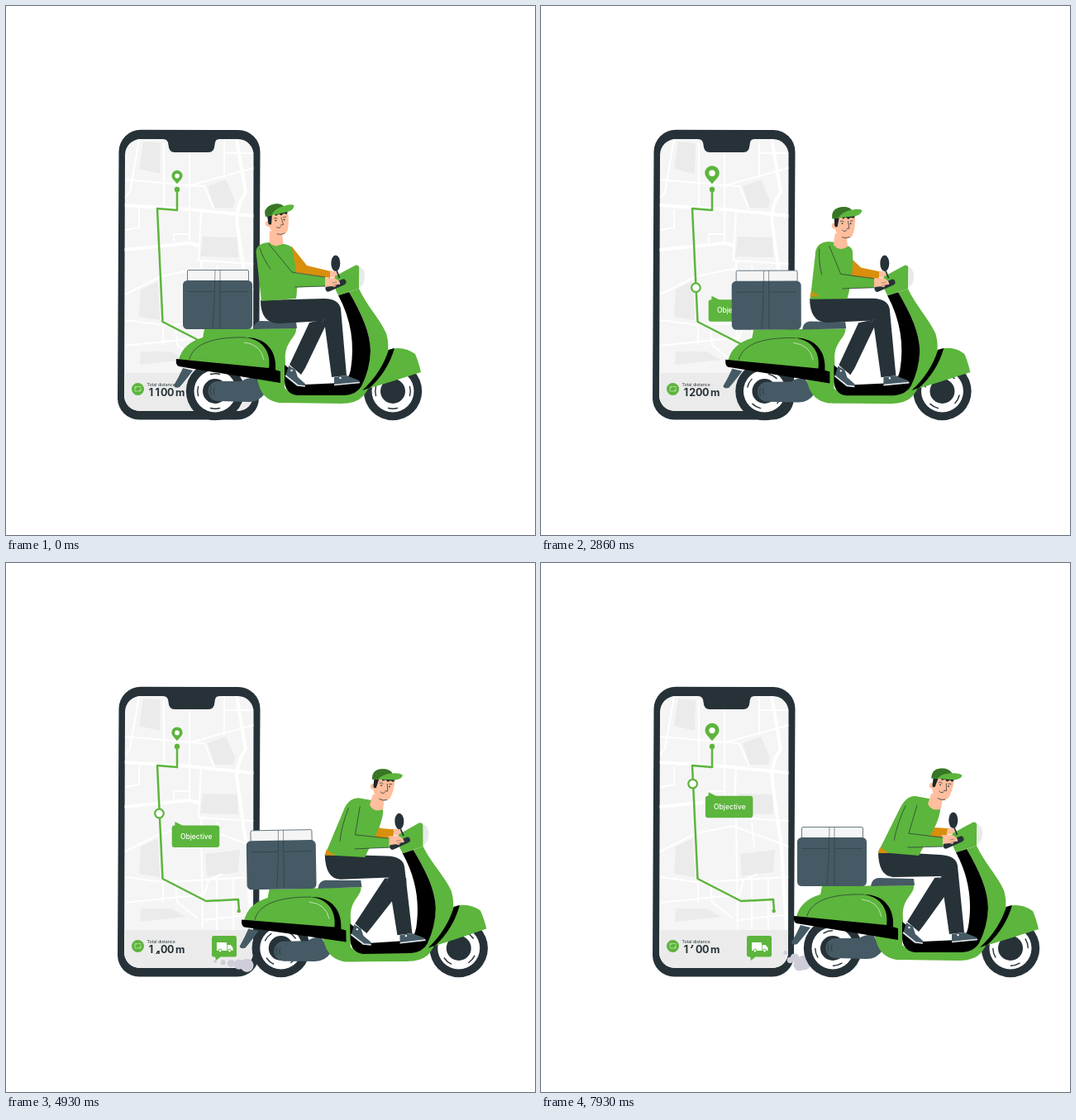
Animation, 640 px wide and 640 px high, one loop 8000 ms. Source, as an HTML page:

```html
<!DOCTYPE html>
<html lang="en">
<head>
<meta charset="utf-8">
<title>Delivery tracking</title>
<style>
html, body { margin: 0; width: 100%; height: 100%; overflow: hidden; background: #fff; }
svg { display: block; width: 100%; height: 100%; }
text { font-family: Inter, "Open Sans", sans-serif; }
.green { fill: #5cb53c; }
.navy { fill: #263238; }
.slate { fill: #455a64; }
.skin { fill: #ffbe9d; }
.orange { fill: #d98f0c; }
.pale { fill: #ebebeb; }
.white { fill: #fff; }
.road { fill: none; stroke: #fff; stroke-width: 2; }
.wide { stroke-width: 4; }
.thin { fill: none; stroke: #263238; stroke-width: .7; stroke-linecap: round; }
.num { font-size: 12.5px; font-weight: 700; text-anchor: middle; }
</style>
</head>
<body>
<svg viewBox="0 0 640 640">
  <defs>
    <clipPath id="screen"><path d="M163 161H190Q196 161 196.500 168Q197 177 204 177H245Q252 177 252.500 168Q253 161 258 161H281A19 19 0 0 1 299.500 180L299 471A19 19 0 0 1 280 490H162A19 19 0 0 1 143 471L144 180A19 19 0 0 1 163 161Z"/></clipPath>
    <clipPath id="slot"><rect x="179" y="462" width="9.500" height="11"/></clipPath>
  </defs>

  <g id="phone">
    <path class="navy" d="M163 149.800L281 150A26.500 26.500 0 0 1 307.500 176.500L306 475A26 26 0 0 1 280 500.500H161A26 26 0 0 1 135 475L136.500 176A26.500 26.500 0 0 1 163 149.800Z"/>
    <g clip-path="url(#screen)">
      <rect x="140" y="155" width="165" height="340" fill="#f5f5f5"/>
      <path class="pale" d="M166 164L187 166L186 203L161 197ZM244 218L266 210L277 235L275 244L252 244ZM238 279L280 280L281 304L235 303ZM163 343L184 333L186 380L161 376ZM241 352L283 347L281 374L243 379ZM163 418H200L218 428L162 434Z"/>
      <path class="road wide" d="M143 241L222 246L300 254M279 161L290 225Q277 244 280 265L291 345L297 444M143 295L222 287L234 290"/>
      <path class="road" d="M222 177V287M161 161L150 225L144 232M191 165V242M144 210L223 217L300 196M223 217L240 218L252 246M161 246V268L144 271M203 286V276H222M236 247L233 308L300 312M144 349L188 327L232 318L300 343M188 327L186 292M236 308L238 444M255 314L258 345M144 380L190 386L300 380M144 411L240 401L245 384L262 376M205 384L207 410L232 430M255 384V444M275 380V444M240 432L300 425M190 386V410M264 178H300M264 161V208"/>
      <rect class="pale" x="140" y="444" width="165" height="50"/>
    </g>
    <path d="M207 222V247L183 245L189.500 382L242 409L281 407L282 421" fill="none" stroke="#5cb53c" stroke-width="2.500" stroke-linejoin="round"/>
    <circle class="green" cx="207" cy="222" r="3.200"/>
    <circle class="green" cx="281.700" cy="421" r="2.200"/>
    <g id="pin">
      <path class="green" d="M0 0C-2.500 -3.500 -6.500 -6 -6.500 -10A6.500 6.500 0 0 1 6.500 -10C6.500 -6 2.500 -3.500 0 0Z"/>
      <circle class="white" cy="-9.700" r="2.800"/>
    </g>
    <circle class="green" cx="159.500" cy="463.500" r="7.500"/>
    <path d="M156 460.500H163V466H156ZM156 463L158 461M161 466L163 464" fill="none" stroke="#fff" stroke-width=".6" opacity=".75"/>
    <text class="navy" x="170.500" y="460" font-size="5.200">Total distance</text>
    <g class="navy num">
      <text x="175.500" y="472.300">1</text>
      <g clip-path="url(#slot)"><g id="roll"></g></g>
      <text x="191.200" y="472.300">0</text>
      <text x="199.300" y="472.300">0</text>
      <text x="210.700" y="472.300">m</text>
    </g>
    <rect class="green" x="249" y="451" width="30" height="25.500" rx="2.500"/>
    <path class="green" d="M253 476L254 481L260 476Z"/>
    <path class="white" d="M255 459H267V469H255ZM267.700 462H271.500L274.500 465.500V469H267.700Z"/>
    <g class="white" stroke="#5cb53c"><circle cx="259" cy="469" r="1.900"/><circle cx="270.500" cy="469" r="1.900"/></g>
    <g id="stop">
      <circle id="ring" r="5.300" stroke-width="2.200"/>
      <g id="label">
        <rect class="green" x="15.300" y="14.500" width="57.500" height="26.500" rx="3"/>
        <path class="green" d="M19 10L31 16H19Z"/>
        <text class="white" x="25.500" y="30.600" font-size="8.500" font-weight="500">Objective</text>
      </g>
    </g>
  </g>

  <path id="streak" stroke="#f2c27a" stroke-width="1.200"/>
  <g id="smoke" fill="#cfcdd8"></g>

  <g id="ride">
    <g id="wheels"></g>
    <g id="body">
      <path class="slate" d="M203 459Q209 449 214 438L226 441Q217 453 210 461Q204 463 203 459Z"/>
      <path class="slate" d="M255 454H285Q293 449 302 450L313 469Q306 479 294 479L258 478A12 12 0 0 1 255 454Z"/>
      <path class="thin" d="M252 462Q250 466 252 470M248 461Q246 466 248 471"/>
      <path class="green" d="M209 428Q214 408 238 401L240 391L351 390C352 402 336 405 338 430L337 462L345 469H360V480H330Q313 477 307 462L300 440Z"/>
      <path class="thin" d="M222 427C227 407 255 400 290 401"/>
      <path d="M290 401C317 401 328 420 326 441L318 439C321 420 312 404 290 401Z"/>
      <path d="M288 407Q308 409 312 428" fill="none" stroke="#d7edcf" stroke-width=".8"/>
      <path d="M206 427L318 438L332 442V456L209 436Q205 434 206 427Z"/>
      <path class="slate" d="M299 391Q300 382 308 381L351 382L352 390Z"/>
      <path class="green" d="M415 346L427 342C436 362 452 378 460 396C466 416 460 432 450 441C442 452 440 463 432 472Q424 481 405 481L335 480L340 468L425 465Q440 440 441 418C441 395 430 372 415 346Z"/>
      <path d="M402 350L415 346C430 372 441 395 441 418Q440 440 430 460Q424 470 410 471H352Q338 469 337 454V434L342 438Q343 454 362 458L405 456Q415 452 417 440C422 410 418 380 402 350Z"/>
      <path class="green" d="M434 464Q446 427 462 416Q480 410 495 421Q499 430 502 443Q462 456 434 464Z"/>
      <path d="M463 416L470 414Q462 442 440 462L431 465Q454 444 463 416Z"/>
      <g id="box">
        <rect x="219.500" y="319.500" width="74" height="14" rx="1.500" fill="#f5f5f5" stroke="#455a64" stroke-width=".8"/>
        <rect class="slate" x="214" y="332" width="84" height="59" rx="5.500"/>
        <path class="thin" d="M220 345.500H252M260 345.500H292M253 320L252 360L250 390M259 320V390" style="stroke-width:.5"/>
      </g>

      <path id="backArm" class="orange"/>
      <path class="skin" d="M392 320L398 321Q404 324 402 329L392 328Z"/>
      <path id="backLeg" class="navy"/>
      <path class="slate" d="M342 435L350 440L353 449L362 457L361 460L352 460L338 448Z"/>
      <path d="M338 447L353 459L362 460" fill="none" stroke="#e4e9ec" stroke-width="1.700"/>
      <circle class="white" cx="345.500" cy="441" r="1.200"/>
      <path id="leg" class="navy"/>
      <path class="thin" d="M386 378L382 383" style="stroke:#55646b"/>
      <path class="slate" d="M397 449L412 447L427 453L428 456L397 458Z"/>
      <path d="M397 458.500L428 455.500" stroke="#e4e9ec" stroke-width="1.700"/>
      <circle class="white" cx="404.500" cy="450" r="1.200"/>
      <path id="torso" class="green"/>
      <path id="hem" class="orange" d="M308 351L310 344L321 351Z"/>
      <g id="head">
        <path class="skin" d="M319 272L318.500 286Q326 294 335.500 287L334 276Z"/>
        <path class="skin" d="M317 253L341 249Q343 265 340 273Q336 278 329 277Q321 275 318.500 267Q313 267 314 262Q315 259 317 260Z"/>
        <path d="M316 254L322 252L321 264Q317 266 317 260ZM324 250Q332 246 341 248L339.500 252L336 251L333 253.500L330 251.500L326.500 254Z" fill="#1c262a"/>
        <path class="thin" d="M333 256L335.500 264.500L332.500 265M327.500 267.500Q330 270 332.500 267M324 257Q326 255.500 328 257M335.500 255.500L338.500 255M328 276Q333 277.500 337 275"/>
        <circle class="navy" cx="326.400" cy="259.500" r=".9"/><circle class="navy" cx="336.500" cy="258.500" r=".9"/>
        <path class="green" d="M314 255Q311 245 320 241Q330 237 336 242Q344 239 348.500 241Q349 246 341 249Q331 251 314 255Z"/>
        <path d="M314 255Q311 245 320 241Q330 237 336 242Q325 245 321 253Z" fill="#397526"/>
      </g>
      <path class="green" d="M398 327L423 313.500Q427 313 427.500 317L427 342L402 350Q395 338 398 327Z"/>
      <path d="M427.500 315Q434 318 434 327Q434 337 427.300 341Z" fill="#e9e9e9"/>
      <path d="M400 320L403.500 329" stroke="#263238" stroke-width="1.700"/>
      <ellipse class="navy" cx="398.800" cy="311.200" rx="5.500" ry="9.800"/>
      <path d="M390 342L408 334" stroke="#263238" stroke-width="7" stroke-linecap="round"/>
      <path class="skin" d="M385 329L397 329Q405 332 404 337Q400 336 398 340L394 339L385 340Z"/>
      <path class="thin" d="M395 335L400 334M396 338L400 337" style="stroke-width:.4"/>
      <path id="arm" class="green"/>
      <path id="fold" class="thin"/>
    </g>
  </g>
</svg>
<script>
const LOOP = 8000;
const $ = id => document.getElementById(id);
const set = (id, name, value) => $(id).setAttribute(name, value);
const clamp = v => Math.max(0, Math.min(1, v));

// Monotone cubic through [time, value] pairs given as a flat list.
function key(list, t) {
  const n = list.length / 2, T = i => list[2 * i], V = i => list[2 * i + 1];
  if (t <= T(0)) return V(0);
  if (t >= T(n - 1)) return V(n - 1);
  let i = 0;
  while (t > T(i + 1)) i++;
  const slope = j => (V(j + 1) - V(j)) / (T(j + 1) - T(j));
  const tangent = j => {
    if (j === 0) return slope(0);
    if (j === n - 1) return slope(n - 2);
    const a = slope(j - 1), b = slope(j);
    return a * b > 0 ? 2 * a * b / (a + b) : 0;
  };
  const h = T(i + 1) - T(i), u = (t - T(i)) / h, w = 1 - u;
  return V(i) * (1 + 2 * u) * w * w + tangent(i) * h * u * w * w
    + V(i + 1) * u * u * (3 - 2 * u) - tangent(i + 1) * h * u * u * w;
}

// Blends the numbers of two paths that share the same commands.
function morph([a, b], k) {
  const to = b.match(/-?[\d.]+/g);
  let i = 0;
  return a.replace(/-?[\d.]+/g, v => (+v + (to[i++] - v) * k).toFixed(2));
}

const MOVE = {
  ride: [0, 0, 1210, 7, 2290, 14.5, 3500, 22, 4930, 79.7, 5140, 88, 6600, 113.6, 6790, 113.5, 7930, 100, 8000, 99],
  tilt: [0, 0, 1210, .28, 2290, .28, 3500, .05, 4930, 1, 6790, 1, 7930, 0],
  lean: [0, 0, 1210, 0, 2290, .12, 3500, .71, 4930, .93, 6790, .97, 8000, 1.03],
  knee: [0, 0, 3500, 0, 4930, 1, 6790, 1, 8000, .7],
  pin: [0, 199, 850, 190.3, 1210, 192, 1790, 194, 2290, 197, 2500, 197.5, 2950, 193, 3500, 200.5, 4000, 197, 4500, 199.5, 4800, 198.5, 5200, 199, 7500, 199, 7930, 194, 8000, 193],
  stop: [0, 358, 1210, 354, 2290, 346, 3500, 333, 4930, 303, 6790, 278, 8000, 266.5],
  digit: [0, 1, 2150, 1, 2290, 1.33, 2500, 2, 3700, 2, 4000, 3, 4750, 3, 4930, 3.6, 5080, 4, 5700, 4, 5950, 5, 6550, 5, 6790, 5.87, 6870, 6, 7150, 6, 7400, 7, 7800, 7, 7930, 7.35, 8000, 7.6],
  box: [0, 0, 3500, -.5, 4930, -.8, 6790, -3, 7930, -4]
};

const POSE = {
  torso: ["M318 286C306 287 301 292 303 302L309 357L351 354C354 338 350 310 346 293C343 288 335 288 331 287Z",
    "M352 282C342 282 337 290 334 296L308 350L357 354C364 339 380 318 382 299C382 294 376 289 368 285Z"],
  arm: ["M306 293C309 285 319 286 324 292L346 322L386 328L386 339L341 341Q335 341 331 336Z",
    "M344 290C348 284 354 287 354 293L345 327L386 332L386 343L336 344Q325 342 328 333Z"],
  fold: ["M318 288L346 322L386 328M386 339L350 340M307 293Q312 308 320 318",
    "M354 293L345 327L386 332L386 343L344 344M340 294Q330 316 327 335"],
  backArm: ["M345 290L364 314L393 321L392 329L348 322L345 312Z",
    "M369 319L380 320L392 321L391 332L364 332L367 322Z"],
  leg: ["M308 356L385 354Q402 354 405 366L412 447L394 449L385 381L330 384Q308 384 308 356Z",
    "M308 349L383 353Q402 354 404 366L412 447L394 449L384 379L326 380Q308 379 308 349Z"]
};
const BACK_LEG = ["M367 383L386 379V388L362 438L357 446L343 434Z",
  "M380 380L406 380V386L363 439L357 446L343 434Z"];

const HUBS = [253, 468], SPOKES = [0, 90, 180, 270], PUFFS = 5;
const STREAKS = [660, 3750, 5560, 6740];

$("wheels").innerHTML = HUBS.map(x => `<g transform="translate(${x} 466)">
  <circle class="navy" r="35.200"/><circle class="white" r="25.500"/><circle class="navy" r="15"/>
  <g class="spin">${SPOKES.map(a => `<path class="thin" style="stroke-width:1.400" transform="rotate(${a})" d="M20.500 -5.500Q22 0 20.500 5.500"/>`).join("")}</g></g>`).join("");
$("roll").innerHTML = [1, 2, 3, 4, 5, 6, 7, 8].map((d, i) =>
  `<text x="183.300" y="${472.3 + 18 * i}">${d}</text>`).join("");
$("smoke").innerHTML = "<circle/>".repeat(PUFFS);

function drawPhone(t) {
  const grow = (215.3 - key(MOVE.pin, t)) / 16.3;
  set("pin", "transform", `translate(207 215.300) scale(${grow})`);
  set("roll", "transform", `translate(0 ${-18 * (key(MOVE.digit, t) - 1)})`);

  const y = key(MOVE.stop, t), x = 182.5 + (y - 246) * .0515;
  const show = clamp((t - 700) / 900), tint = clamp((t - 1200) / 500);
  set("stop", "transform", `translate(${x} ${y})`);
  set("ring", "opacity", show);
  set("ring", "fill", `rgba(255,255,255,${tint})`);
  set("ring", "stroke", `rgb(${190 - 98 * tint},${196 - 15 * tint},${190 - 130 * tint})`);
  const pop = clamp((t - 800) / 350);
  set("label", "transform", `translate(19 10) scale(${pop}) translate(-19 -10)`);
}

function drawSmoke(t, x) {
  const size = clamp((t - 2950) / 1200);
  const spread = key([3400, 0, 4300, 1, 4930, 1, 5700, 0], t);
  [...$("smoke").children].forEach((puff, i) => {
    const p = (t / 1300 + i / PUFFS) % 1;
    const sway = (i % 2 ? 3 : -3) * (1 - spread);
    puff.setAttribute("cx", 253 + x - 32 - (28 + 20 * spread) * p);
    puff.setAttribute("cy", 488 - (15 - 9 * spread) * p + sway);
    puff.setAttribute("r", size * (2 + 8 * Math.pow(1 - p, 1.3)));
  });
}

function draw(t) {
  const x = key(MOVE.ride, t), lean = key(MOVE.lean, t);
  drawPhone(t);
  drawSmoke(t, x);

  const start = STREAKS.filter(s => s <= t).pop();
  const tip = 640 - .6 * (t - start);
  set("streak", "d", tip > 470 ? `M${tip} 358h32` : "");

  // The frame rocks on the front axle.
  set("ride", "transform", `translate(${x} 0)`);
  set("body", "transform", `rotate(${-key(MOVE.tilt, t)} 468 466)`);
  set("box", "transform", `translate(${key(MOVE.box, t)} 0)`);
  document.querySelectorAll(".spin").forEach(g =>
    g.setAttribute("transform", `rotate(${x / 35 * 180 / Math.PI})`));

  for (const id in POSE) set(id, "d", morph(POSE[id], lean));
  set("backLeg", "d", morph(BACK_LEG, key(MOVE.knee, t)));
  set("hem", "opacity", clamp(lean * 2));
  set("head", "transform", `translate(${55 * lean} ${9 * lean}) rotate(${16 * lean} 328 260)`);
}

function frame(now) {
  draw(now % LOOP);
  requestAnimationFrame(frame);
}
draw(0);
requestAnimationFrame(frame);
</script>
</body>
</html>
```
